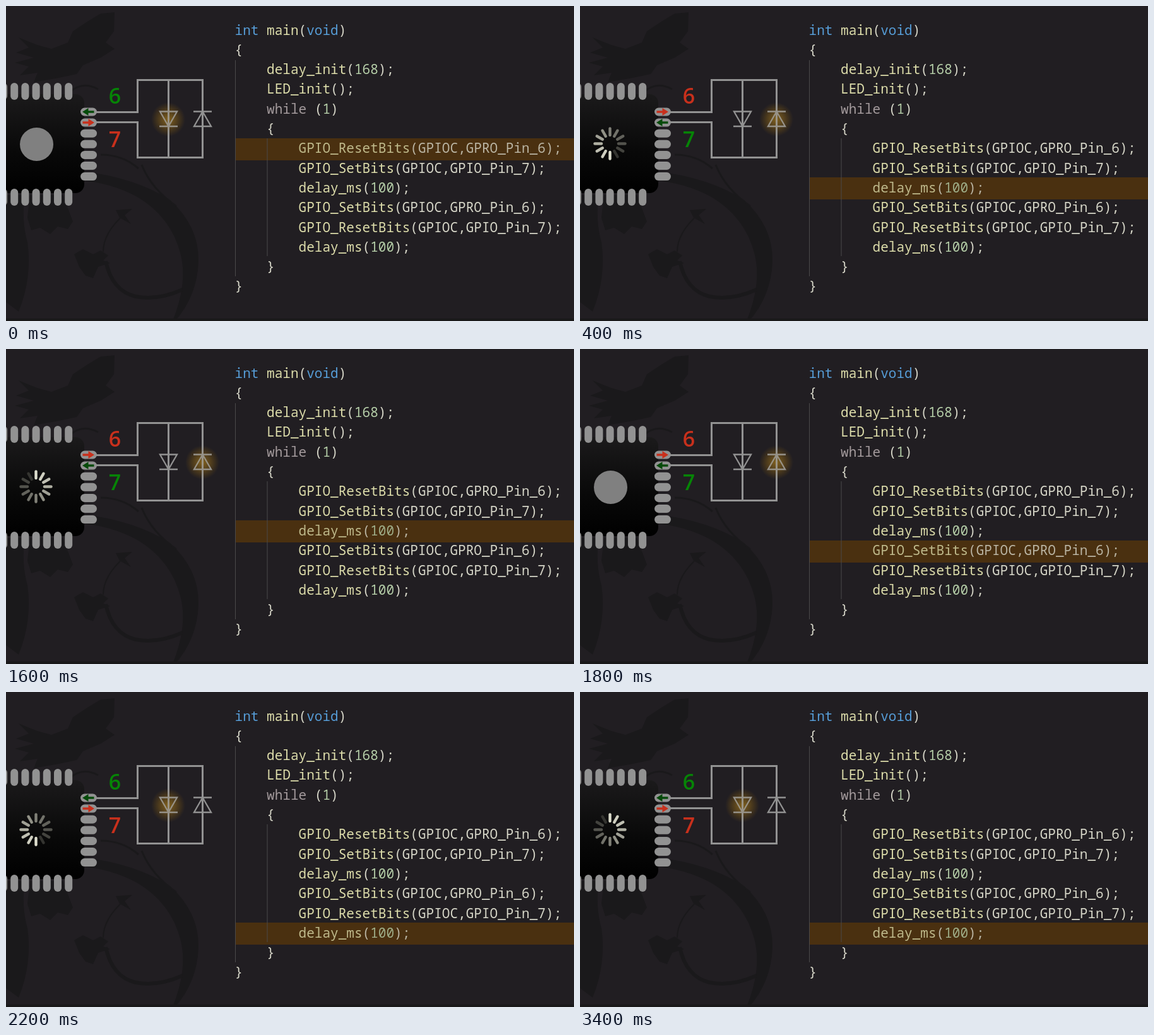
These frames come from a looping animation (900x500 px, 3600 ms). An HTML page with a canvas:

```html
<!DOCTYPE html>
<html lang="en">
<head>
<meta charset="utf-8">
<title>Two pins, two LEDs</title>
<style>
  html, body { margin: 0; height: 100%; overflow: hidden; background: #211e22; }
  canvas { display: block; }
</style>
</head>
<body>
<canvas id="stage" width="900" height="500"></canvas>
<script>
const ctx = document.getElementById('stage').getContext('2d');
const GREY = '#929292', RED = '#c8301c', GREEN = '#068406';
const STEP = 200, STEPS = 18, LINE = 31.3;

const code = `int main(void)
{
    delay_init(168);
    LED_init();
    while (1)
    {
        GPIO_ResetBits(GPIOC,GPRO_Pin_6);
        GPIO_SetBits(GPIOC,GPIO_Pin_7);
        delay_ms(100);
        GPIO_SetBits(GPIOC,GPRO_Pin_6);
        GPIO_ResetBits(GPIOC,GPIO_Pin_7);
        delay_ms(100);
    }
}`.split('\n');

const keywords = { int: '#569cd6', void: '#569cd6', while: '#a39a9c' };

function tokenColor(token, next = '') {
  if (keywords[token]) return keywords[token];
  if (/^\d/.test(token)) return '#b5cea8';
  return /^\w/.test(token) && next[0] === '(' ? '#dcdcaa' : '#d6d6c8';
}

function box(x, y, w, h, fill) {
  ctx.fillStyle = fill;
  ctx.fillRect(x, y, w, h);
}

function pill(x, y, w, h, r, fill) {
  ctx.fillStyle = fill;
  ctx.beginPath();
  ctx.roundRect(x, y, w, h, r);
  ctx.fill();
}

function shape(d, fill) {
  ctx.fillStyle = fill;
  ctx.fill(new Path2D(d));
}

function trace(d, color, width) {
  ctx.strokeStyle = color;
  ctx.lineWidth = width;
  ctx.stroke(new Path2D(d));
}

function drawBackdrop() {
  const ink = '#1a191b';
  box(0, 0, 900, 500, '#211e22');
  shape(`M172 10 L150 12 130 24 106 40 98 58 72 68 50 62 20 50 36 66 16 74 44 82 14 90
    36 96 22 110 50 106 44 121 84 114 112 108 122 94 150 82 172 68 158 58 171 40Z`, ink);
  shape('M0 300 H30 Q24 340 34 375 Q42 430 20 485 L0 470Z', ink);
  shape('M38 300 H90 L106 342 98 354 82 350 70 362 54 352 40 356 34 336Z', ink);
  shape(`M118 262 Q205 272 260 308 Q306 350 305 405 Q303 460 268 500 H264
    Q288 440 277 395 Q262 335 208 303 Q165 280 118 277Z`, ink);
  shape('M108 394 L122 386 138 394 150 388 162 396 154 404 165 408 146 414 138 432 126 428 116 414Z', ink);
  shape('M174 324 L200 322 188 332 198 346 180 336Z', ink);
  trace('M158 405 Q168 452 205 461 Q240 468 280 450', ink, 6);
  trace('M154 390 Q154 360 188 330', ink, 2);
  trace('M150 236 Q185 236 210 258 M215 252 Q230 290 270 318 M100 138 Q120 118 146 132', ink, 3);
  box(0, 496, 900, 4, '#1a191a');
}

function drawChip() {
  const body = ctx.createLinearGradient(0, 140, 0, 297);
  body.addColorStop(0, '#1b1a1b');
  body.addColorStop(.6, '#080808');
  body.addColorStop(1, '#000');
  pill(-20, 140, 144, 157, 14, body);
  for (let i = 0; i < 7; i++) {
    const x = -10 + i * 17.2;
    pill(x, 122, 12, 27, 6, GREY);
    pill(x, 290, 12, 27, 6, GREY);
    pill(118, 161.5 + i * 17.1, 26, 13, 6.5, GREY);
  }
}

function drawPin(name, high, pinY, labelY) {
  ctx.save();
  ctx.translate(130.5, pinY);
  if (!high) ctx.scale(-1, 1);
  shape('M-9 -1.8 H0 V-6 L9.5 0 0 6 V1.8 H-9Z', high ? RED : '#064a0a');
  ctx.restore();
  ctx.font = '600 34px "Open Sans", sans-serif';
  ctx.textAlign = 'center';
  ctx.fillStyle = high ? RED : GREEN;
  ctx.fillText(name, 172.5, labelY);
}

function drawGlow(x, strength) {
  const glow = ctx.createRadialGradient(x, 180, 2, x, 180, 27);
  glow.addColorStop(0, `rgba(225, 165, 30, ${strength})`);
  glow.addColorStop(.5, `rgba(200, 140, 15, ${strength * .55})`);
  glow.addColorStop(1, 'rgba(180, 120, 0, 0)');
  box(x - 27, 153, 54, 54, glow);
}

function drawCircuit(pin6, pin7) {
  const lit = pin6 === pin7 ? 0 : pin7 ? 257 : 311;
  if (lit) drawGlow(lit, .4);
  trace('M143 168.5 H208.5 V117.5 H311.5 V240.5 H208.5 V184.5 H143 M257.5 117.5 V240.5', GREY, 3);
  trace('M244 167.5 H271 L257.5 191Z M243 191 H272', GREY, 2.3);
  trace('M298 191 H325 L311.5 167.5Z M297 167.5 H326', GREY, 2.3);
  if (lit) drawGlow(lit, .12);
}

// Twelve spokes, fading clockwise from the given clock hour
function drawSpinner(hour) {
  ctx.lineCap = 'round';
  for (let i = 0; i < 12; i++) {
    const a = (hour + i) * Math.PI / 6, s = Math.sin(a), c = -Math.cos(a);
    const v = 222 - i * 15.5;
    trace(`M${47.5 + 13.5 * s} ${218.5 + 13.5 * c} L${47.5 + 24 * s} ${218.5 + 24 * c}`,
      `rgb(${v}, ${v}, ${v * .93})`, 4.4);
  }
  ctx.lineCap = 'butt';
}

function drawCode(active) {
  box(363, Math.round(22 + active * LINE), 537, 35, '#4a3010');
  box(363, 86, 1, 343, '#4a494a');
  box(413.5, 210, 1, 187, '#4a494a');
  ctx.font = '500 21.05px "Noto Sans Mono", monospace';
  ctx.textAlign = 'left';
  const advance = ctx.measureText('0').width;
  code.forEach((line, row) => {
    let x = 362.5;
    const tokens = line.match(/\w+|\W+/g);
    ctx.globalAlpha = row === active ? .8 : 1;
    tokens.forEach((token, i) => {
      ctx.fillStyle = tokenColor(token, tokens[i + 1]);
      ctx.fillText(token, x, 45.5 + row * LINE);
      x += token.length * advance;
    });
  });
  ctx.globalAlpha = 1;
}

function draw() {
  const step = Math.floor(performance.now() / STEP) % STEPS;
  const half = Math.floor(step / 9), phase = step % 9;
  const pin6 = step >= 1 && step < 10;
  const pin7 = step < 2 || step >= 11;

  drawBackdrop();
  drawChip();
  drawCircuit(pin6, pin7);
  drawPin('6', pin6, 168, 155);
  drawPin('7', pin7, 185, 224);
  if (phase < 2) pill(22, 193, 53, 53, 26.5, '#808080');
  else drawSpinner(phase + 4);
  drawCode(6 + 3 * half + Math.min(phase, 2));
  requestAnimationFrame(draw);
}
draw();
</script>
</body>
</html>
```
